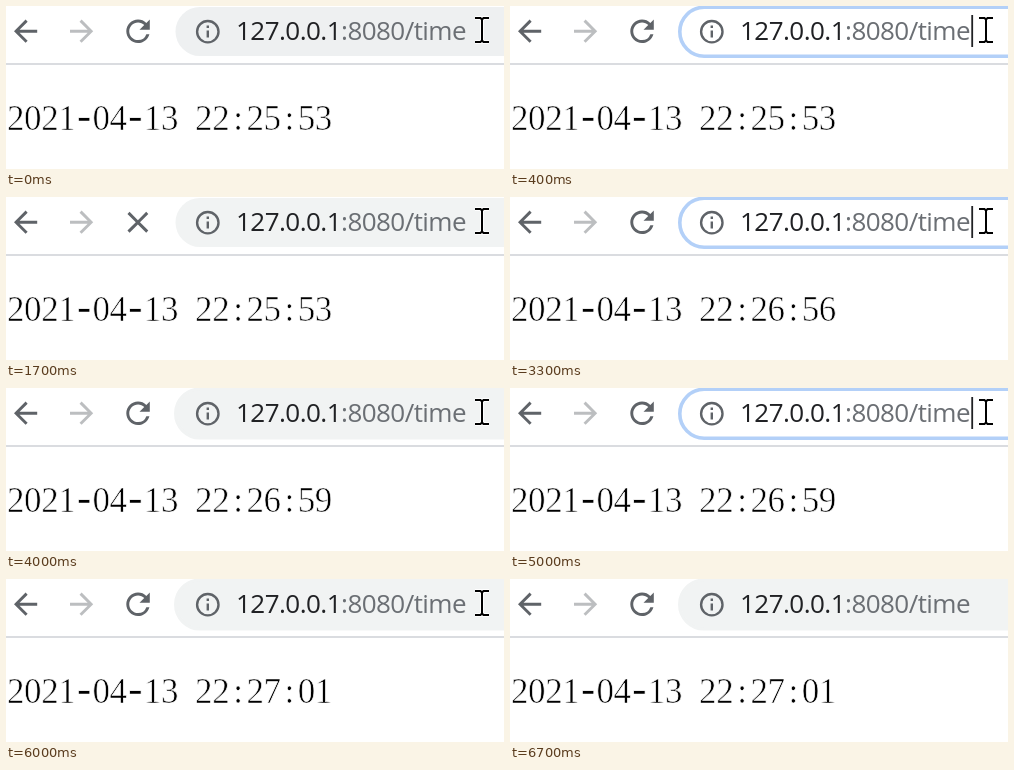
These frames come from a looping animation (498x163 px, 6.9 s). An HTML page:

```html
<!DOCTYPE html>
<html lang="en">
<head>
<meta charset="utf-8">
<title>Server time</title>
<style>
  html, body { margin: 0; width: 100%; height: 100%; overflow: hidden; background: #fff; }
  svg { display: block; width: 498px; height: 163px; }
  .icon { fill: #5f6368; }
  .url { font: 26px "Open Sans", "Noto Sans", sans-serif; letter-spacing: -.55px; fill: #202124; white-space: pre; }
  /* The white outline trims the strokes to a lighter weight. */
  .clock { font: 35px "Liberation Serif", serif; text-anchor: middle; fill: #000; stroke: #fff; stroke-width: .7px; }
  .dash { font-size: 44px; }
</style>
</head>
<body>
<svg viewBox="0 0 498 163">
  <rect width="498" height="163" fill="#fff"/>
  <rect y="57" width="498" height="2" fill="#dadce0"/>

  <path class="icon" transform="translate(2.2 7.8) scale(1.45)" d="M20 11H7.83l5.59-5.59L12 4l-8 8 8 8 1.41-1.41L7.83 13H20z"/>
  <path class="icon" opacity=".42" transform="translate(93 7.8) scale(-1.45 1.45)" d="M20 11H7.83l5.59-5.59L12 4l-8 8 8 8 1.41-1.41L7.83 13H20z"/>
  <path id="reload" class="icon" transform="translate(114.4 7.6) scale(1.47)" d="M17.65 6.35A7.96 7.96 0 0 0 12 4c-4.42 0-7.99 3.58-7.99 8s3.57 8 7.99 8c3.73 0 6.84-2.55 7.73-6h-2.08A5.99 5.99 0 0 1 12 18c-3.31 0-6-2.69-6-6s2.69-6 6-6c1.66 0 3.14.69 4.22 1.78L13 11h7V4z"/>
  <path id="stop" class="icon" transform="translate(114 7.4) scale(1.49)" d="M19 6.41 17.59 5 12 10.59 6.41 5 5 6.41 10.59 12 5 17.59 6.41 19 12 13.41 17.59 19 19 17.59 13.41 12z"/>

  <rect id="pill" x="169.5" y="1" width="380" height="49" rx="24.5" stroke-width="3"/>
  <rect id="ring" x="169.8" y="1.3" width="380" height="48.9" rx="24.4" fill="#fff" stroke="#b3d0f8" stroke-width="3.6"/>

  <g fill="none" stroke="#5f6368" stroke-width="2.4">
    <circle cx="201.8" cy="25.7" r="10.7"/>
    <path d="M201.8 19.4v2.5M201.8 24.4v7"/>
  </g>

  <rect id="selection" x="230" y="8" width="232" height="35" fill="#a8c9f8"/>
  <text class="url" x="230" y="34">127.0.0.1<tspan id="path">:8080/time</tspan></text>
  <rect id="caret" x="461.3" y="9" width="1.8" height="32" fill="#202124"/>

  <g id="clock" class="clock"></g>

  <g id="pointer" fill="none">
    <path d="M-7-12h5.5L0-10.5 1.5-12H7M0-10.5v21M-7 12h5.5L0 10.5 1.5 12H7" stroke="#fff" stroke-width="4"/>
    <path d="M-7-12h5.5L0-10.5 1.5-12H7M0-10.5v21M-7 12h5.5L0 10.5 1.5 12H7" stroke="#000" stroke-width="2"/>
  </g>
</svg>
<script>
const LOOP = 6900;
const CELL = 17.1;
const IDLE = "#f1f3f3";
const HOME = [476, 24];

// Each step changes only what it names; the rest carries over.
// "fading" is the blurred address bar while its focus ring still takes up room.
const STEPS = [
  { at: 0, mode: "blur", time: "22:25:53", loading: false, fill: "#eef0f1", pointer: HOME },
  { at: 100, fill: "#eceef0" },
  { at: 400, mode: "caret" },
  { at: 500, mode: "select" },
  { at: 1700, mode: "blur", loading: true, fill: IDLE },
  { at: 1800, loading: false, time: "22:26:56" },
  { at: 3300, mode: "caret" },
  { at: 3400, mode: "select" },
  { at: 4000, mode: "fading", time: "22:26:59" },
  { at: 5000, mode: "caret" },
  { at: 5200, mode: "select" },
  { at: 6000, mode: "fading", time: "22:27:01" },
  { at: 6500, pointer: [482, 27] },
  { at: 6600, pointer: [488, 29.5] },
  { at: 6700, pointer: null }
];

const el = id => document.getElementById(id);
const show = (id, on) => el(id).setAttribute("visibility", on ? "visible" : "hidden");

// The clock is set on a fixed grid, one glyph per cell.
const glyphs = [..."2021-04-13 00:00:00"].map((char, i) => {
  const glyph = document.createElementNS("http://www.w3.org/2000/svg", "text");
  glyph.setAttribute("x", 1.2 + CELL * (i + .5));
  glyph.setAttribute("y", 124);
  if (char === "-") glyph.setAttribute("class", "dash");
  glyph.textContent = char;
  return el("clock").appendChild(glyph);
});

function stateAt(ms) {
  return Object.assign({}, ...STEPS.filter(step => step.at <= ms));
}

function draw(state) {
  const { mode, time, loading, fill, pointer } = state;
  show("reload", !loading);
  show("stop", loading);
  show("ring", mode === "caret" || mode === "select");
  show("caret", mode === "caret");
  show("selection", mode === "select");
  show("pointer", pointer);
  el("pill").setAttribute("fill", fill);
  el("pill").setAttribute("stroke", mode === "fading" ? fill : "none");
  el("path").setAttribute("fill", mode === "select" ? "#202124" : "#6b6f74");
  if (pointer) el("pointer").setAttribute("transform", `translate(${pointer})`);
  [...time].forEach((char, i) => { glyphs[11 + i].textContent = char; });
}

const start = performance.now();
function tick() {
  draw(stateAt((performance.now() - start) % LOOP));
  requestAnimationFrame(tick);
}
tick();
</script>
</body>
</html>
```
